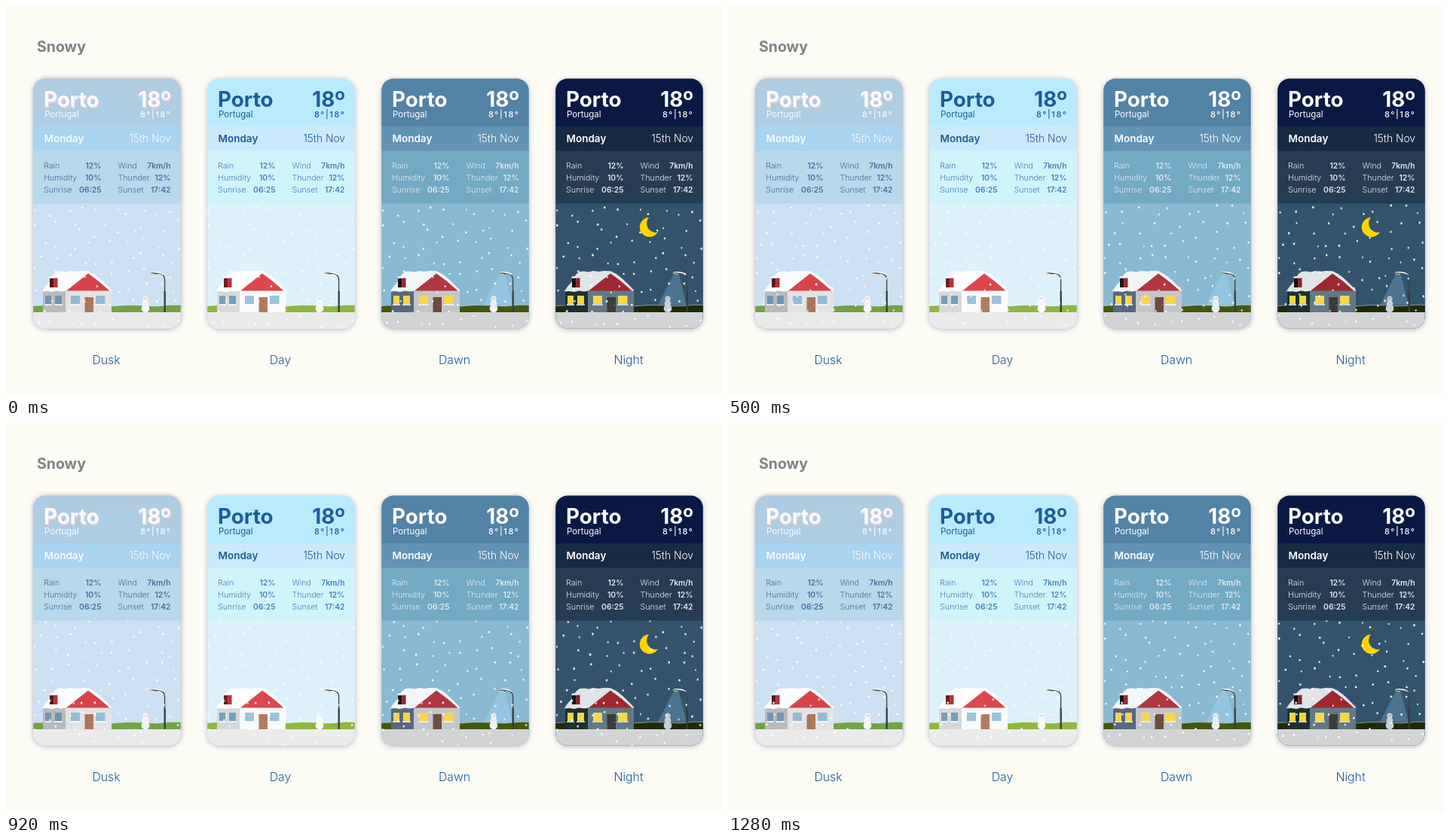
These frames come from a looping animation (950 px wide and 517 px high, 1320 ms). An HTML page:

```html
<!DOCTYPE html>
<html lang="en">
<head>
<meta charset="utf-8">
<title>Snowy</title>
<style>
  html, body { margin: 0; width: 100%; height: 100%; overflow: hidden; background: #fcfbf4; }
  svg { display: block; width: 950px; height: 517px; font-family: Inter, "Open Sans", sans-serif; }
  .title { font-size: 19.5px; font-weight: 700; fill: #818185; }
  .label { font-size: 15.8px; font-weight: 300; fill: #1f5c98; text-anchor: middle; }
  .big { font-size: 27.8px; font-weight: 700; }
  .sub { font-size: 11.5px; }
  .range { font-size: 11px; font-weight: 500; letter-spacing: 1.6px; }
  .day { font-size: 13.5px; font-weight: 600; }
  .date { font-size: 13.8px; font-weight: 300; }
  .key { font-size: 10.7px; font-weight: 300; }
  .val { font-size: 10.3px; font-weight: 600; }
  .end { text-anchor: end; }
  .shade { filter: drop-shadow(0 1px 3.5px rgba(75, 85, 145, .45)); }
  .blush { filter: drop-shadow(1px -2px 2px rgba(245, 190, 180, .4)); }
  .pink { text-shadow: 1px 2px 0 #e9d3d9; }
</style>
</head>
<body>
<script>
const LOOP = 1320, TOP = 262, FALL = 167, WIDTH = 196;

const themes = [
  { name: 'Dusk', head: '#aecce2', bar: '#a9d3ee', stats: '#b9d8e9', sky: '#cbe1f2',
    ink: '#fafcff', small: '#476f9f', ground: '#eaeaeb', grass: '#71a346',
    wing: '#b9babc', wall: '#e3e3e4', roof: '#d8434a', snow: '#fbfcfd', brick: '#b52f37', dark: '#59171f',
    pane: '#6f96b4', glass: '#94bad5', door: '#ab765b', man: '#f7f7f8', beam: 0 },
  { name: 'Day', head: '#baeafe', bar: '#cce9fb', stats: '#d1f3fc', sky: '#def2fc',
    ink: '#1e5c99', small: '#4681b8', ground: '#ebebec', grass: '#8fb643',
    wing: '#d7d8da', wall: '#fbfbfc', roof: '#dc474d', snow: '#fff', brick: '#b9323a', dark: '#6d1b23',
    pane: '#759fbd', glass: '#9cc3dc', door: '#b17b5e', man: '#fcfcfc', beam: 0 },
  { name: 'Dawn', head: '#5282a4', bar: '#6293b4', stats: '#72a9c3', sky: '#8ab9d2',
    ink: '#fff', small: '#e1edf3', ground: '#d2d3d4', grass: '#40590f',
    wing: '#59677f', wall: '#c3c6c9', roof: '#b1363f', snow: '#f3f6f8', brick: '#932a31', dark: '#21131b',
    pane: '#f5d54c', glass: '#f7d64b', door: '#6e4c3c', man: '#eef2f5', beam: .35 },
  { name: 'Night', head: '#0a1944', bar: '#152b41', stats: '#263c50', sky: '#33536b',
    ink: '#fff', small: '#e4e9ee', ground: '#d3d4d6', grass: '#1f2a0b',
    wing: '#1d302f', wall: '#607984', roof: '#9e2830', snow: '#e1e4e8', brick: '#87212b', dark: '#140c10',
    pane: '#f2d546', glass: '#f6d948', door: '#3d3a3b', man: '#c8d0d9', beam: .24 }
];

const stats = [
  ['Rain', '12%', 'Wind', '7km/h'],
  ['Humidity', '10%', 'Thunder', '12%'],
  ['Sunrise', '06:25', 'Sunset', '17:42']
];

const rect = (x, y, w, h, fill, more = '') =>
  `<rect x="${x}" y="${y}" width="${w}" height="${h}" fill="${fill}" ${more}/>`;
const path = (d, fill, more = '') => `<path d="${d}" fill="${fill}" ${more}/>`;
const dot = (x, y, r, fill) => `<circle cx="${x}" cy="${y}" r="${r}" fill="${fill}"/>`;
const text = (x, y, cls, str, fill) =>
  `<text x="${x}" y="${y}" class="${cls}" ${fill ? `fill="${fill}"` : ''}>${str}</text>`;

let seed = 11;
const random = () => (seed = seed * 16807 % 2147483647) / 2147483647;

// Loosely gridded flakes, stacked twice so the fall wraps without a seam.
function makeFlakes() {
  const cols = 10, rows = 8;
  let out = '';
  for (let i = 0; i < cols * rows; i++) {
    const x = (i % cols + .1 + random() * .8) * WIDTH / cols;
    const y = TOP + (Math.floor(i / cols) + .1 + random() * .8) * FALL / rows;
    const r = 1.05 + random() * .4;
    for (const lift of [0, FALL])
      out += dot(x.toFixed(1), (y - lift).toFixed(1), r.toFixed(2), '#fff');
  }
  return out;
}

function panels(t) {
  const pink = t.name === 'Dusk' ? ' pink' : '';
  let out = rect(0, 96, WIDTH, 64, t.head) + rect(0, 160, WIDTH, 33, t.bar) +
    rect(0, 192.5, WIDTH, 70, t.stats) +
    text(14, 134, 'big' + pink, 'Porto', t.ink) + text(183, 134, 'big end' + pink, '18º', t.ink) +
    text(15, 148, 'sub', 'Portugal', t.ink) + text(183.5, 148, 'range end', '8°|18°', t.ink) +
    text(14.5, 181, 'day', 'Monday', t.ink) + text(183, 181, 'date end', '15th Nov', t.ink);
  stats.forEach(([a, b, c, d], i) => {
    const y = 215.5 + i * 16;
    out += text(14, y, 'key', a, t.small) + text(90.5, y, 'val end', b, t.small) +
      text(112.5, y, 'key', c, t.small) + text(182.5, y, 'val end', d, t.small);
  });
  return out;
}

function house(t) {
  const pane = (x, w, fill) => rect(x, 385, w, 11.5, fill) +
    rect(x - 1, 396.3, w + 2, 1.6, t.snow);
  return rect(13, 377, 30.5, 30, t.wing) + path('M43 407V378L73 355 104 378V407Z', t.wall) +
    path('M43.5 378.5 73 354.5 102.5 378.5Z', t.roof) +
    path('M11.5 379.5 16 373 22 366 27 357 32 353 38 352.5 44 353.5 50 352 57 353 64 352 73 352.2 ' +
      'Q80 355 86 360 T104.5 378L102 379 88 366.5 73 355.5 44 378.5 38 379.5 31 378.5 25 380 18 379Z', t.snow) +
    rect(22, 361, 5.5, 13, t.dark) + rect(27.3, 361, 5.2, 13, t.brick) +
    path('M21.5 362V359.6Q27 358.4 33 359.8V361.6Z', t.snow) +
    pane(16, 8, t.pane) + pane(29, 9, t.pane) +
    pane(50, 12, t.glass) + pane(83, 12.5, t.glass) +
    rect(68.5, 387, 11.5, 20, t.door) + dot(78, 397.5, .6, '#e5d5b5');
}

function snowman(t) {
  return dot(149, 402, 5.4, t.man) + dot(149, 395.3, 4.3, t.man) + dot(149, 389, 3.6, t.man) +
    dot(147.8, 388.5, .5, '#555') + dot(150.2, 388.5, .5, '#555') + dot(149, 390, .6, '#e59a4b') +
    dot(149, 395, .4, '#777');
}

function lamp() {
  return path('M174.6 407V363Q174.2 355.5 164 354.8', 'none', 'stroke="#3d4248" stroke-width="1.4"') +
    rect(173.6, 379, 2.2, 28, '#363b41') +
    path('M155 355.2 158 353.4 166 354.4 164 356.8Z', '#4c5156') +
    path('M155 354.5Q158 352 167 353.5 172 354.5 174.5 358 170 355.5 166 355 161 354 155 354.5Z', '#fff') +
    path('M156.5 355.6 163 356.7', 'none', 'stroke="#ecd77d" stroke-width=".9"');
}

function scene(t) {
  const moon = path('M124 281A13 13 0 1 0 136 300.5 12 12 0 0 1 124 281Z', '#fed500');
  const hill = 'M0 398.5Q20 397 44 398L104 399Q125 396.5 145 398T170 398.5Q185 396.5 196 397.5';
  const beam = path('M157 356 164 357 174 397.5 136 397.5Z', '#a5d9f8', `opacity="${t.beam}"`);
  return rect(0, TOP, WIDTH, FALL, t.sky) + (t.name === 'Night' ? moon : '') +
    path(hill + 'V408H0Z', t.grass) +
    path(hill, 'none', 'stroke="#fff" stroke-width=".9" opacity=".5"') +
    rect(0, 407, WIDTH, 22.5, t.ground) +
    house(t) + (t.beam ? beam : '') + snowman(t) + lamp();
}

const flakes = makeFlakes();

function card(t, i) {
  const base = cls => rect(.5, 97, WIDTH - 1, 331.5, t.sky, `rx="16" class="${cls}"`);
  return `<g transform="translate(${36 + i * 231} 0)">${i ? '' : base('blush')}${base('shade')}
    <g clip-path="url(#card)">${scene(t)}
      <g clip-path="url(#sky)"><g class="snow">${flakes}</g></g>${panels(t)}</g>
    ${text(97, 475.5, 'label', t.name)}</g>`;
}

document.body.innerHTML = `<svg viewBox="0 0 950 517">
  <defs>
    <clipPath id="card">${rect(.2, 96.4, WIDTH - .5, 332.4, '#000', 'rx="16"')}</clipPath>
    <clipPath id="sky">${rect(0, TOP, WIDTH, FALL, '#000')}</clipPath>
  </defs>
  ${text(41, 61, 'title', 'Snowy')}${themes.map(card).join('')}</svg>`;

for (const snow of document.querySelectorAll('.snow'))
  snow.animate(
    [{ transform: 'translateY(0px)' }, { transform: `translateY(${FALL}px)` }],
    { duration: LOOP, iterations: Infinity });
</script>
</body>
</html>
```
